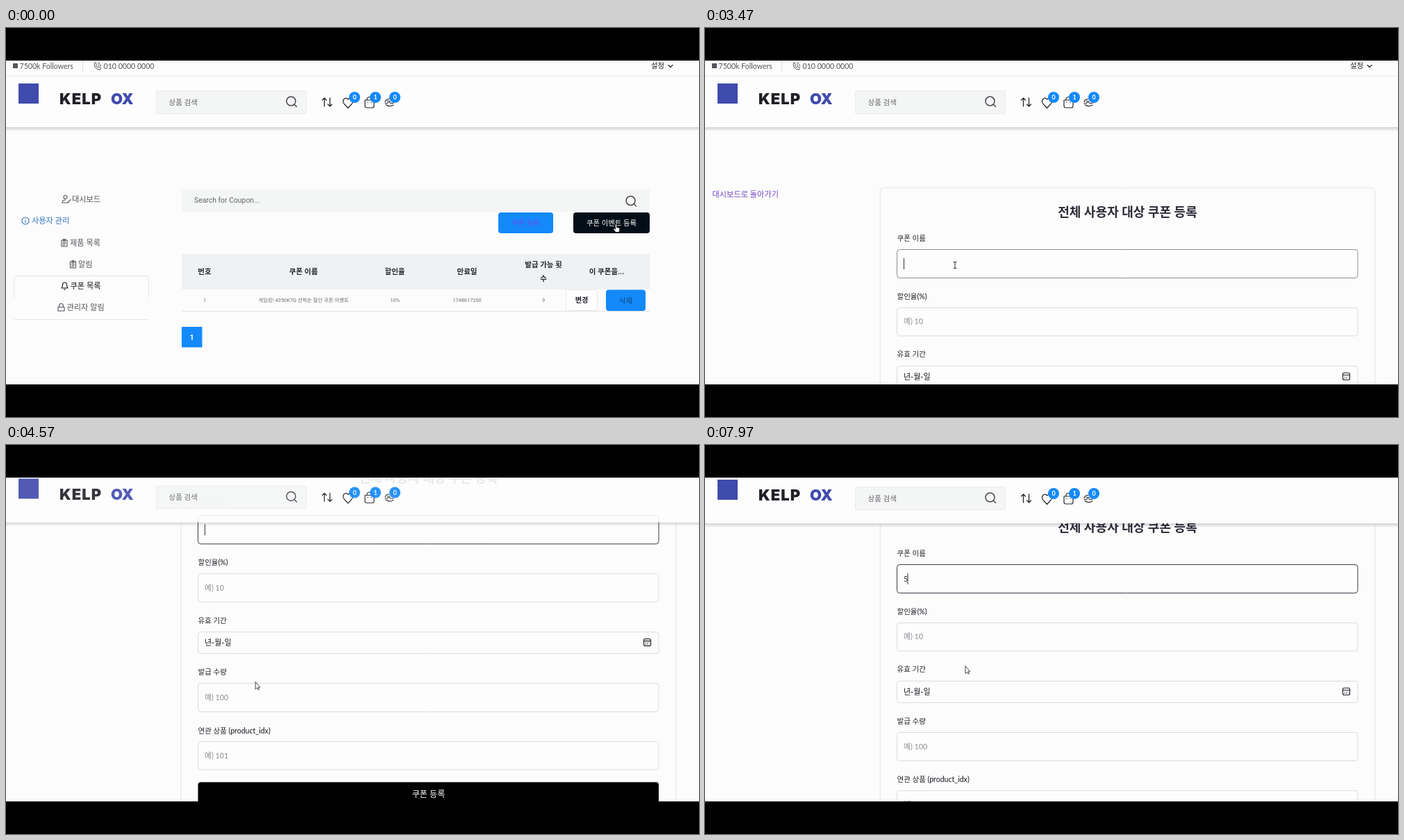
These frames come from a looping animation (998 by 561 pixels, 8000 ms). An HTML page with a canvas:

```html
<!DOCTYPE html>
<html lang="ko">
<head>
<meta charset="utf-8">
<title>쿠폰 등록</title>
<style>
html, body { margin: 0; width: 100%; height: 100%; overflow: hidden; background: #000; }
canvas { display: block; width: 998px; height: 561px; }
</style>
</head>
<body>
<canvas id="stage" width="998" height="561"></canvas>
<script>
const ctx = document.getElementById('stage').getContext('2d');
const LOOP = 8000, TOP = 47, BOTTOM = 514;
const SANS = "Lato, 'Noto Sans CJK KR', 'Noto Sans CJK', sans-serif";
const ROBOTO = "Roboto, 'Noto Sans CJK KR', 'Noto Sans CJK', sans-serif";
const PAGE = '#fcfcfc', INK = '#24242c', BLUE = '#1389fb';
const OPEN_FORM = 2000, FOCUS = 3430, STICKY = 4100, TYPED = 7750;

const clamp = v => Math.max(0, Math.min(1, v));
const smooth = p => p * p * (3 - 2 * p);
const part = (t, from, to) => clamp((t - from) / (to - from));
const ease = (t, from, to) => smooth(part(t, from, to));

// y is the vertical centre of the line
function text(str, x, y, size, { color = INK, weight = 400, align = 'left', font = SANS } = {}) {
  ctx.font = `${weight} ${size}px ${font}`;
  ctx.fillStyle = color;
  ctx.textAlign = align;
  ctx.fillText(str, x, y + size * 0.37);
}

function rect(x, y, w, h, color) {
  ctx.fillStyle = color;
  ctx.fillRect(x, y, w, h);
}

function box(x, y, w, h, r, fill, stroke) {
  ctx.beginPath();
  ctx.roundRect(x, y, w, h, r);
  if (fill) { ctx.fillStyle = fill; ctx.fill(); }
  if (stroke) { ctx.strokeStyle = stroke; ctx.lineWidth = 1; ctx.stroke(); }
}

function disc(x, y, r, color) {
  ctx.beginPath();
  ctx.arc(x, y, r, 0, Math.PI * 2);
  ctx.fillStyle = color;
  ctx.fill();
}

function line(d, x, y, color = INK, width = 1.2, fill) {
  const path = new Path2D(d);
  ctx.save();
  ctx.translate(x, y);
  ctx.lineCap = ctx.lineJoin = 'round';
  if (fill) { ctx.fillStyle = fill; ctx.fill(path); }
  ctx.strokeStyle = color;
  ctx.lineWidth = width;
  ctx.stroke(path);
  ctx.restore();
}

const ICON = {
  search: 'M6-.5A6.5 6.5 0 1 1-7-.5A6.5 6.5 0 1 1 6-.5M4.5 4.5L7.5 7.5',
  phone: 'M-4-4.5Q-6 4 4 5.2L5 2.5L2 .8L.5 2Q-1.5 1-2-1L-1-2.5L-2.5-5ZM1-5Q5-4 5 0M1-2.5Q2.5-2 2.5 0',
  chevron: 'M-3-1.5L0 1.5L3-1.5',
  sort: 'M-4 6V-6M-7-3L-4-6L-1-3M4-6V6M1 3L4 6L7 3',
  heart: 'M0 8L-5.5 2C-9.5-3-4-9.5 0-4.5C4-9.5 9.5-3 5.5 2Z',
  bag: 'M-6.5-3.5H6.5V5Q6.5 7.5 4 7.5H-4Q-6.5 7.5-6.5 5ZM-4-3.5Q-3.5-8 0-8Q3.5-8 4-3.5M-2.5-.5V0M2.5-.5V0',
  swap: 'M-6-1Q-5-5 0-5M-6 1H-3Q0-2 2 1H6M-5 3Q0 7 6 3.5M-3-2H1',
  user: 'M1-3A2.5 2.5 0 1 1-4-3A2.5 2.5 0 1 1 1-3M-6 5Q-6 1-1.5 1M-6 5H1M2 4.5L6 .5M1.5 5L3 4.8',
  info: 'M5 0A5 5 0 1 1-5 0A5 5 0 1 1 5 0M0-.5V2.5M0-2.6V-2.4',
  clip: 'M-4-4H4V5H-4ZM-1.5-5.5H1.5V-3H-1.5ZM-2-1H2M-2 1H2M-2 3H1',
  bell: 'M-4.5 3Q-3 1-3-1.5Q-3-5 0-5Q3-5 3-1.5Q3 1 4.5 3ZM-1 5H1',
  lock: 'M-4.5-.5H4.5V5H-4.5ZM-3-.5V-2.5Q-3-5.5 0-5.5Q3-5.5 3-2.5V-.5',
  calendar: 'M-3-5H3Q5-5 5-3V3Q5 5 3 5H-3Q-5 5-5 3V-3Q-5-5-3-5M-5-2H5M-2.5.5H-2.4M0 .5H.1M2.5.5H2.6M-2.5 2.7H-2.4M0 2.7H.1',
  arrow: 'M0 0V10.5L2.5 8.3L4 11.3L5.4 10.6L4 7.8H6.2Z',
  beam: 'M-2-4.5H-.7L0-4L.7-4.5H2M0-4V4M-2 4.5H-.7L0 4L.7 4.5H2',
  hand: 'M-1.5-6Q0-7 .5-5.5V-1.5L4-.8Q5-.5 4.8 1L4 5.5H-1L-4 1.5Q-4.5 0-3 0L-1.5 1Z'
};

function topBar() {
  rect(10, 51, 7, 7, '#55555c');
  text('7500k Followers', 19.5, 55, 10.6, { color: '#55555c' });
  rect(110, 48, 1, 14, '#dcd9d2');
  line(ICON.phone, 131.5, 55, '#55555c', 1);
  text('010 0000 0000', 140.5, 55, 10.6, { color: '#55555c' });
  text('설정', 929, 54.5, 10.4, { weight: 500 });
  line(ICON.chevron, 957, 55);
  rect(0, 69, 998, 1, '#e9e9ea');
}

function header(top) {
  const shade = ctx.createLinearGradient(0, 143, 0, 149);
  shade.addColorStop(0, 'rgba(40,40,60,.2)');
  shade.addColorStop(1, 'rgba(40,40,60,0)');
  rect(0, 143, 998, 6, shade);
  rect(0, top, 998, 143 - top, '#fdfdfd');
  rect(18, 80, 29, 29, '#3f4bad');
  ctx.letterSpacing = '1px';
  text('KELP', 77, 102.3, 22, { color: '#202027', weight: 900, font: 'Inter, sans-serif' });
  ctx.letterSpacing = '0px';
  text('OX', 151, 102.3, 22, { color: '#3f4bad', weight: 900, font: 'Inter, sans-serif' });
  box(216.5, 90.5, 216, 33, 1, '#f4f5f5', '#ececea');
  text('상품 검색', 234.5, 107, 10.5, { color: '#66666c' });
  line(ICON.search, 411, 106, '#4a4650', 1.5);
  line(ICON.sort, 462.5, 107, INK, 1.3);
  line(ICON.heart, 492.5, 107.5, INK, 1.2);
  line(ICON.bag, 523.5, 107.5, INK, 1.2);
  line(ICON.swap, 552, 107.5, INK, 1.2);
  [[502, '0'], [532, '1'], [560, '0']].forEach(([x, n]) => {
    disc(x, 100, 8, BLUE);
    text(n, x, 100, 9, { color: '#fff', weight: 700, align: 'center' });
  });
}

function listPage() {
  box(11.5, 357.5, 194, 40, 4, null, '#e6e6de');
  rect(8, 389, 202, 12, PAGE);
  rect(11, 420, 195, 1, '#e8e8ee');
  const gray = '#55555c', link = '#2f72c4';
  [['대시보드', 95, 247, 'user', 87, gray],
   ['사용자 관리', 37, 278, 'info', 28, link],
   ['제품 목록', 92, 310, 'clip', 84, gray],
   ['알림', 104, 341, 'clip', 96.5, gray],
   ['쿠폰 목록', 92.5, 372, 'bell', 84.5, '#111'],
   ['관리자 알림', 87.5, 403, 'lock', 79.5, gray]
  ].forEach(([label, x, y, icon, ix, color]) => {
    line(ICON[icon], ix, y, color, 1.1);
    text(label, x, y, 11.2, { color });
  });

  rect(253, 233, 674, 32, '#f4f5f5');
  text('Search for Coupon...', 271, 248.5, 10.4, { color: '#66666a', font: ROBOTO });
  line(ICON.search, 900, 249.5, '#4a4650', 1.5);
  const mid = { align: 'center', font: ROBOTO };
  box(709, 266, 79, 30, 4, BLUE);
  text('쿠폰 등록', 748.5, 281, 10.4, { ...mid, color: '#6a4fe6' });
  box(817, 266, 110, 30, 4, '#030f18');
  text('쿠폰 이벤트 등록', 872, 281, 10.4, { ...mid, color: '#fff', weight: 500 });

  rect(253, 326, 674, 51, '#eff2f3');
  [['번호', 286, 351], ['쿠폰 이름', 428.5, 351], ['할인율', 560, 351], ['만료일', 664, 351],
   ['발급 가능 횟', 774, 341.5], ['수', 774, 361], ['이 쿠폰을...', 865, 351]
  ].forEach(([label, x, y]) => text(label, x, y, 10.5, { ...mid, weight: 600 }));
  [['1', 286], ['게임킹! 4350K7Q 선착순 할인 쿠폰 이벤트', 428.5], ['10%', 560], ['1748617200', 664], ['9', 774]]
    .forEach(([cell, x]) => text(cell, x, 392.5, 7.4, { ...mid, color: '#6c6c72' }));
  rect(253, 408, 674, 1, '#e4e4e4');
  box(806.5, 377.5, 45, 30, 1, '#fefefe', '#e8e8e4');
  text('변경', 829, 392.5, 10.2, { ...mid, weight: 600 });
  box(864, 377.5, 57, 30.5, 4, BLUE);
  text('삭제', 892.5, 393, 10.4, { ...mid, color: '#12467e' });
  rect(253, 431, 29.5, 29.5, BLUE);
  text('1', 267.7, 445.5, 11, { ...mid, color: '#fff', weight: 700 });
}

function field(label, labelY, y, h, hint, border = '#dcdce2') {
  text(label, 276.5, labelY, 10.5, { weight: 500 });
  box(276.5, y, 663.5, h, 4, '#fdfdfd', border);
  if (hint) text(hint, 286, y + h / 2 - 0.3, 10.8, { color: '#8b8f93' });
}

function formPage(t) {
  text('대시보드로 돌아가기', 10.5, 240, 11.2, { color: '#7446c8' });
  box(251.5, 230, 714, 560, 6, null, '#f5f5f7');
  box(252.5, 230.5, 712, 560, 5, PAGE, '#e9e9ee');
  text('전체 사용자 대상 쿠폰 등록', 608.5, 265, 18.1, { color: '#2e2b38', weight: 700, align: 'center' });

  const f = part(t, FOCUS - 30, FOCUS + 120);
  const tone = (from, to) => Math.round(from + (to - from) * f);
  field('쿠폰 이름', 303, 319.5, 41, '', `rgb(${tone(220, 58)},${tone(220, 58)},${tone(226, 72)})`);
  if (t >= TYPED) text('5', 286, 340, 10.8);
  const blinkOn = t >= FOCUS && (t - FOCUS) % 1060 < 530;
  if (blinkOn || t >= TYPED) rect(t >= TYPED ? 291.5 : 286, 332, 1, 16, '#33333a');

  field('할인율(%)', 387, 403.5, 40.5, '예) 10');
  field('유효 기간', 470.5, 487.5, 31, '');
  text('년-월-일', 286, 502.5, 11, { color: '#15151c', weight: 500 });
  line(ICON.calendar, 923.5, 502.5, INK, 1.2);
  field('발급 수량', 545, 561.5, 41, '예) 100');
  field('연관 상품 (product_idx)', 629.5, 645.5, 40.5, '예) 101');
  box(276.5, 704, 663.5, 36, 4, '#000');
  text('쿠폰 등록', 608.5, 721, 12.1, { color: '#fff', weight: 500, align: 'center' });
}

function scrollAt(t) {
  return 220.5 * ease(t, 3780, 4180) - 40.5 * ease(t, 4500, 4950) - 33 * ease(t, 5400, 5750);
}

function pointer(t) {
  if (t < OPEN_FORM) return line(ICON.hand, 879, 289, '#111', 0.8, '#fff');
  const a = ease(t, 2800, 3280), b = ease(t, 4550, 4900);
  const x = 877 - 518 * a + 16 * b, y = 283 + 59 * a - 23 * b;
  if (t > 3200 && t < 3900) line(ICON.beam, x + 1, y, '#222', 1);
  else line(ICON.arrow, x, y, '#333', 0.9, '#fff');
}

function shifted(dy, draw) {
  ctx.save();
  ctx.translate(0, dy);
  draw();
  ctx.restore();
}

function draw(t) {
  rect(0, 0, 998, 561, '#000');
  ctx.save();
  ctx.beginPath();
  ctx.rect(0, TOP, 998, BOTTOM - TOP);
  ctx.clip();
  rect(0, TOP, 998, BOTTOM - TOP, PAGE);
  const scroll = scrollAt(t);
  shifted(-scroll, () => {
    if (t < OPEN_FORM) listPage();
    else formPage(t);
    if (t < STICKY) { header(70); topBar(); }
  });
  if (t >= STICKY) {
    const p = part(t, STICKY, STICKY + 520);
    ctx.globalAlpha = p;
    shifted(-30 - 16 * (1 - p), () => header(60));
    ctx.globalAlpha = 1;
  }
  pointer(t);
  ctx.restore();
}

const start = performance.now();
function tick() {
  draw((performance.now() - start) % LOOP);
  requestAnimationFrame(tick);
}
tick();
</script>
</body>
</html>
```
